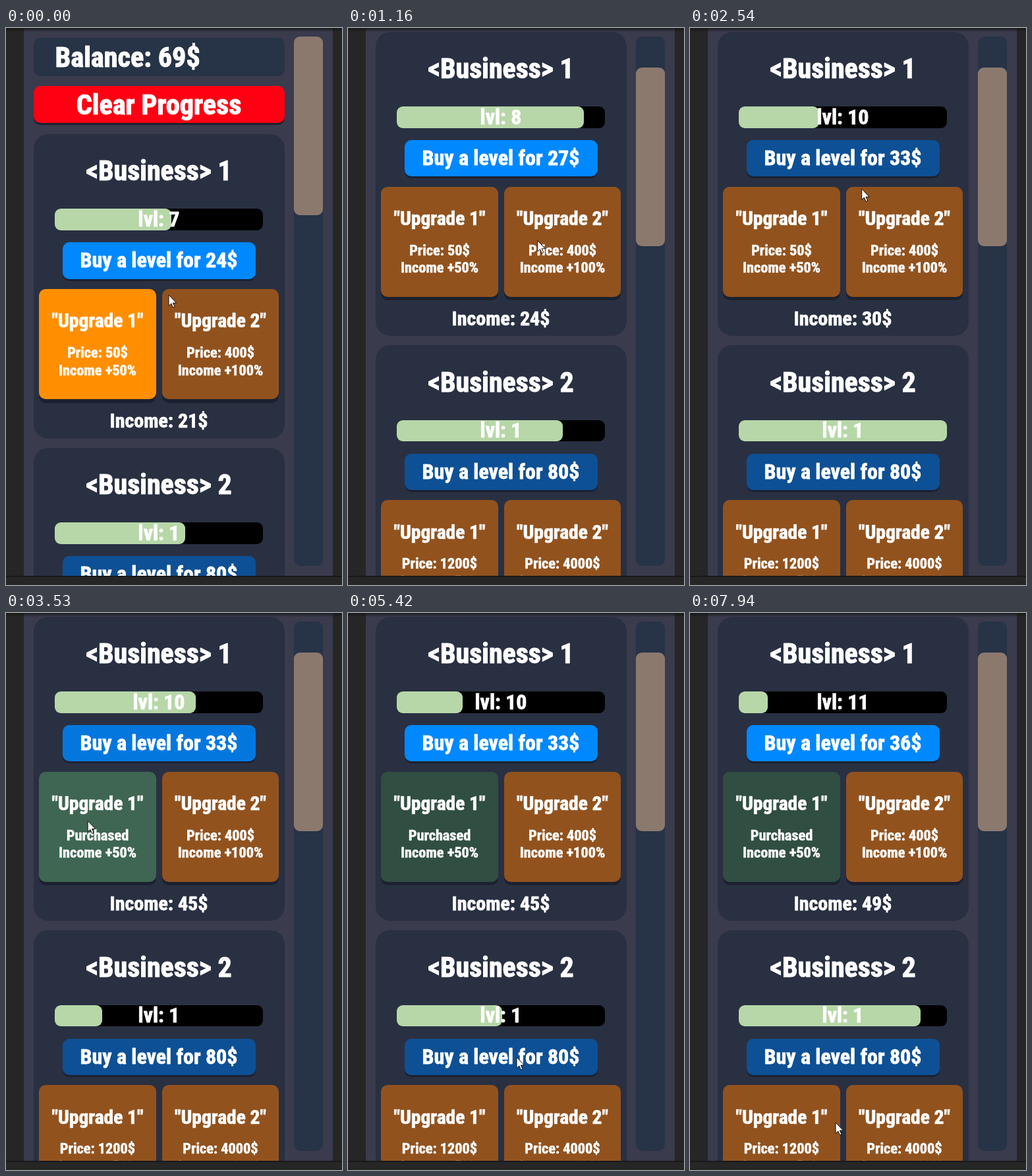
Write an HTML page with a canvas that moves like this. It is 510 px wide and 845 px high and loops after 8000 ms.

```html
<!DOCTYPE html>
<html lang="en">
<head>
<meta charset="utf-8">
<title>Idle business</title>
<style>
  html, body { margin: 0; width: 100%; height: 100%; overflow: hidden; background: #262626; }
  canvas { display: block; }
</style>
</head>
<body>
<canvas id="stage" width="510" height="845"></canvas>
<script>
const ctx = document.getElementById('stage').getContext('2d');
const LOOP = 8000;
const FAMILY = '"Roboto Condensed", Roboto, sans-serif';

const BLUE = [0, 136, 255], BLUE_DIM = [14, 80, 149];
const ORANGE = [255, 143, 0], BROWN = [146, 82, 30];
const GREEN = [66, 108, 86], GREEN_DIM = [48, 78, 66];
const SHADOW = '#1c2130';

const levelBuys = [260, 1350, 1900, 6400];
const upgradeBuy = 3510;
const drag = { from: 490, to: 990, y: 578.3 };

// Cursor stops: time, x, y
const stops = [
  [0, 247, 405], [230, 248, 362], [drag.from, 248, drag.y], [drag.to, 248, 423],
  [1350, 334, 206], [1900, 334, 206], [upgradeBuy, 124, 315], [4600, 256, 674],
  [5420, 256, 674], [6400, 297, 197], [6680, 297, 197], [7300, 134, 640], [7940, 221, 773]
];

const clamp01 = k => Math.max(0, Math.min(1, k));
const smooth = k => k * k * (3 - 2 * k);
const mix = (a, b, k) => a.map((v, i) => v + (b[i] - v) * k);

function cursorAt(t) {
  const i = Math.max(1, stops.findIndex(stop => stop[0] > t));
  if (t >= stops.at(-1)[0]) return stops.at(-1).slice(1);
  const [from, ...a] = stops[i - 1], [to, ...b] = stops[i];
  return mix(a, b, smooth(clamp01((t - from) / (to - from))));
}

const scrollAt = t => t < drag.from ? 0 : drag.y - cursorAt(Math.min(t, drag.to))[1];

// Game state: every finished round pays its business' income.
const rounds1 = { start: .517, rate: .00032 };
const rounds2 = { start: .592, rate: .00016 };
const progress = (rounds, t) => rounds.start + rounds.rate * t;
const levelAt = t => 7 + levelBuys.filter(time => time <= t).length;
const priceAt = level => 3 * level + 3;
const incomeAt = t => Math.floor(3 * levelAt(t) * (t >= upgradeBuy ? 1.5 : 1));
const INCOME_2 = 40;

function balanceAt(t) {
  let money = 69 + INCOME_2 * Math.floor(progress(rounds2, t));
  for (let n = 1; n <= progress(rounds1, t); n++) money += incomeAt((n - rounds1.start) / rounds1.rate);
  for (let level = 7; level < levelAt(t); level++) money -= priceAt(level);
  return t >= upgradeBuy ? money - 50 : money;
}

const buyColor = t => balanceAt(t) >= priceAt(levelAt(t)) ? BLUE : BLUE_DIM;
const upgradeColor = t => balanceAt(t) >= 50 ? ORANGE : BROWN;

// Averaging the last 100 ms turns each colour switch into a linear fade.
function fade(colorAt, t) {
  const samples = Array.from({ length: 10 }, (_, i) => colorAt(t - i * 10));
  return [0, 1, 2].map(c => samples.reduce((sum, color) => sum + color[c], 0) / samples.length);
}

// Roboto is narrowed evenly when no condensed face is installed.
const squeeze = (() => {
  const width = family => {
    ctx.font = 'bold 100px ' + family;
    return ctx.measureText('Business level').width;
  };
  const regular = width('Roboto, sans-serif');
  ctx.fontStretch = 'condensed';
  return width(FAMILY) / regular < .95 ? 1 : .88;
})();

function text(str, x, y, size, align = 'center') {
  ctx.save();
  ctx.translate(x, y);
  ctx.scale(squeeze, 1);
  ctx.font = `bold ${size}px ${FAMILY}`;
  ctx.textAlign = align;
  ctx.fillStyle = ctx.strokeStyle = '#fff';
  ctx.lineWidth = size * .025;
  ctx.lineJoin = 'round';
  ctx.fillText(str, 0, 0);
  ctx.strokeText(str, 0, 0);
  ctx.restore();
}

function box(x, y, w, h, r, color) {
  const [left, top, right, bottom] = [x, y, x + w, y + h].map(Math.round);
  ctx.fillStyle = Array.isArray(color) ? `rgb(${color.map(Math.round)})` : color;
  ctx.beginPath();
  ctx.roundRect(left, top, right - left, bottom - top, r);
  ctx.fill();
}

function button(x, y, w, h, color, depth) {
  box(x, y + depth, w, h, 10, SHADOW);
  box(x, y, w, h, 10, color);
}

function upgrade(x, y, number, status, bonus, color) {
  button(x, y, 177.5, 167, color, 5.5);
  const center = x + 89;
  text(`"Upgrade ${number}"`, center, y + 58.3, 29.5);
  text(status, center, y + 104, 22.3);
  text(`Income +${bonus}%`, center, y + 130.5, 22.3);
}

function card(y, b) {
  box(42, y, 381, 461.5, 22, '#293042');
  text(`<Business> ${b.number}`, 232, y + 70.3, 42);
  box(74, y + 113.3, 316, 32.7, 9, '#000');
  box(74, y + 113.3, 27 + 289 * (b.progress % 1), 32.7, 9, '#b7d7a8');
  text(`lvl: ${b.level}`, 232, y + 140, 32);
  button(86, y + 164.3, 293, 55.2, b.buyColor, 3);
  text(`Buy a level for ${b.price}$`, 232, y + 202.3, 32);
  upgrade(50, y + 235, 1, b.status1, 50, b.upgradeColor);
  upgrade(236.5, y + 235, 2, b.status2, 100, BROWN);
  text(`Income: ${b.income}$`, 232, y + 445, 30);
}

function drawCursor(t) {
  const [x, y] = cursorAt(t);
  const clicking = [...levelBuys, upgradeBuy].some(time => t >= time - 60 && t < time);
  if (clicking || (t >= drag.from && t < drag.to)) {
    box(x - 12, y - 10.5, 24, 24, 12, 'rgba(152,147,28,.9)');
  }
  ctx.save();
  ctx.translate(x, y);
  ctx.fillStyle = '#fff';
  ctx.strokeStyle = '#111';
  ctx.lineWidth = 1;
  const arrow = new Path2D('M0 0V16.5L3.8 13L6.5 19L9 18L6.4 12.1H11.5Z');
  ctx.fill(arrow);
  ctx.stroke(arrow);
  ctx.restore();
}

function draw(t) {
  const scroll = scrollAt(t);
  const level = levelAt(t);
  const purchased = t >= upgradeBuy;

  box(0, 0, 510, 845, 0, '#262626');
  ctx.save();
  ctx.beginPath();
  ctx.rect(0, 0, 510, 831);
  ctx.clip();
  box(27, 0, 469, 831, 0, '#3a3b4d');

  box(42, 14.5 - scroll, 381, 58.5, 10, '#273346');
  text(`Balance: ${balanceAt(t)}$`, 74.5, 59.3 - scroll, 42.3, 'left');
  button(42, 88 - scroll, 381, 55.5, '#ff0013', 3);
  text('Clear Progress', 232, 130.5 - scroll, 42.3);

  card(161 - scroll, {
    number: 1, level, price: priceAt(level), income: incomeAt(t),
    progress: progress(rounds1, t),
    buyColor: fade(buyColor, t),
    upgradeColor: purchased
      ? mix(GREEN, GREEN_DIM, clamp01((t - upgradeBuy) / 100))
      : fade(upgradeColor, t),
    status1: purchased ? 'Purchased' : 'Price: 50$',
    status2: 'Price: 400$'
  });
  card(636.6 - scroll, {
    number: 2, level: 1, price: 80, income: INCOME_2,
    progress: progress(rounds2, t),
    buyColor: BLUE_DIM, upgradeColor: BROWN,
    status1: 'Price: 1200$', status2: 'Price: 4000$'
  });

  box(437, 13, 44, 803, 10, '#273346');
  box(437, 13 + scroll * .303, 44, 271.3, 9, '#8b796e');

  const shade = ctx.createLinearGradient(0, 0, 0, 6);
  shade.addColorStop(0, 'rgba(20,20,20,.8)');
  shade.addColorStop(1, 'rgba(20,20,20,0)');
  ctx.fillStyle = shade;
  ctx.fillRect(0, 0, 510, 6);
  ctx.restore();

  box(0, 831, 510, 2, 0, '#191919');
  drawCursor(t);
}

const start = performance.now();
function tick() {
  draw((performance.now() - start) % LOOP);
  requestAnimationFrame(tick);
}
tick();
</script>
</body>
</html>
```
